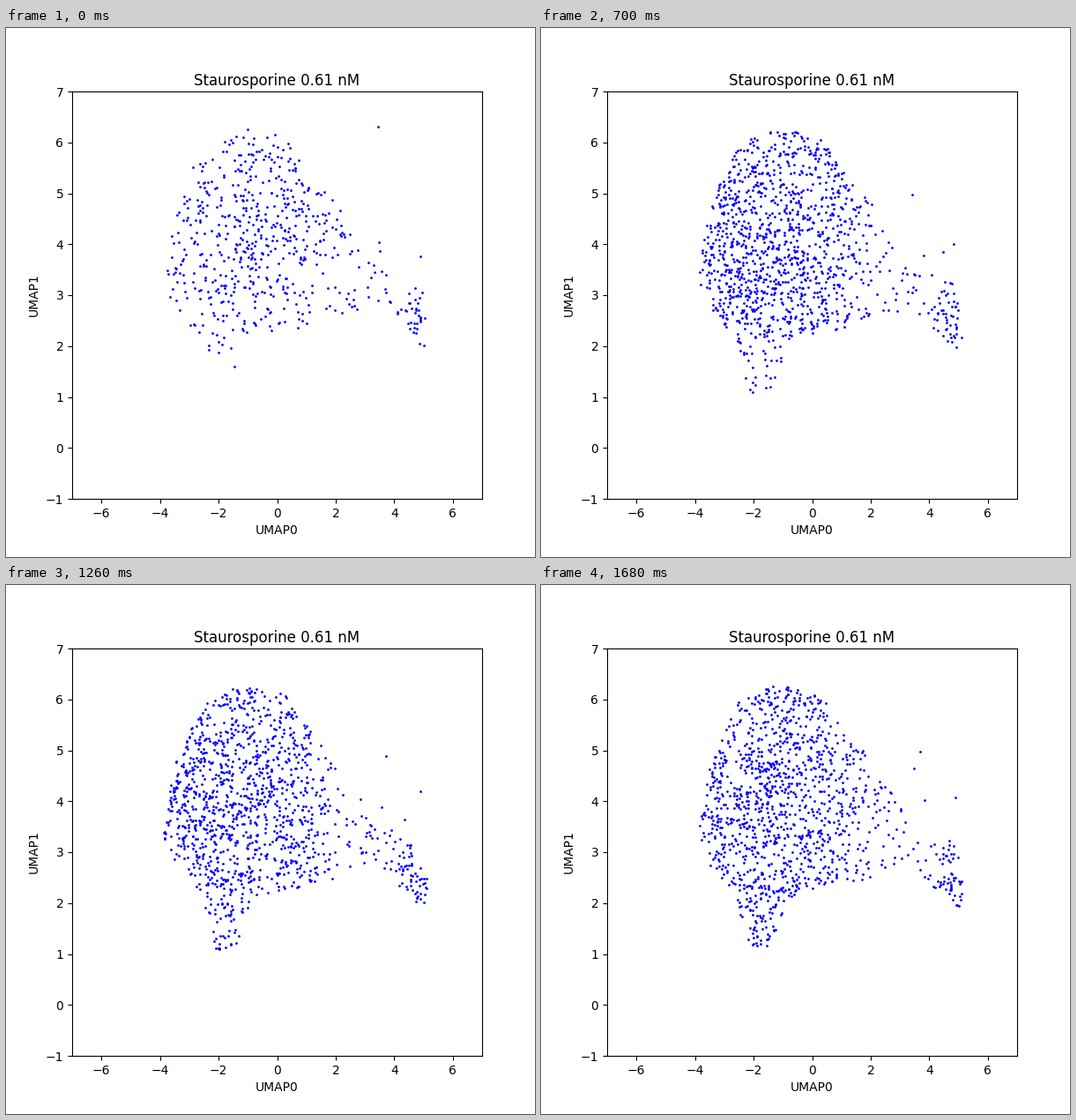
Recreate the animation shown at these times as a matplotlib script. Size 600x600 px, loop 1.82 s.

```python
import numpy as np
import matplotlib.pyplot as plt
from matplotlib.animation import FuncAnimation
from matplotlib.path import Path

FRAMES, STEP = 13, 140

# body, arm to the right, foot at the bottom
OUTLINE = Path([(-3.9, 3.3), (-3.5, 4.8), (-2.5, 5.95), (-1.4, 6.3),
                (0.2, 6.15), (1.4, 5.2), (2.3, 4.6), (3.3, 3.6), (4.9, 3.2),
                (5.2, 2.2), (5.0, 1.9), (3.3, 2.75), (1.5, 2.4), (-0.9, 2.1),
                (-1.3, 1.2), (-2.2, 1.05), (-2.6, 2.15), (-3.5, 2.75)])


def sigmoid(v):
    return 1 / (1 + np.exp(-v))


def bump(x, y, cx, cy, size):
    return np.exp(-((x - cx) ** 2 + (y - cy) ** 2) / (2 * size ** 2))


def density(x, y, step, rng):
    early = np.exp(-1.5 * step)
    late = (step / (FRAMES - 1)) ** 2
    # the crowd moves from the right side to the left
    w = 0.8 + (0.4 + 0.4 * early) * bump(x, y, 3 * early - 2.4, 4 + 0.7 * early, 0.9)
    for cx, cy in rng.normal((-1.2, 4.2), 1.1, (4, 2)):
        w += 0.35 * bump(x, y, cx, cy, 0.4)
    thin = 0.32 + 0.3 * early
    w *= thin + (1 - thin) * sigmoid(4 * (1.5 - x))
    # the foot fills up over time
    low = 0.4 + 0.7 * late
    w *= low + (1 - low) * sigmoid(10 * (y - 2.35))
    return w + (1.1 + 0.6 * early) * bump(x, y, 4.8, 2.5, 0.4)


def cells(step):
    rng = np.random.default_rng(100 + step)
    count = int(1230 - 640 * np.exp(-1.5 * step))
    box = OUTLINE.get_extents()
    pts = rng.uniform(box.min, box.max, (16 * count, 2))
    pts = pts[OUTLINE.contains_points(pts)]
    w = density(*pts.T, step, rng)
    pts = pts[rng.uniform(0, w.max(), len(w)) < w][:count]
    strays = (3.4, 3.6) + rng.exponential((0.5, 0.6), (4, 2)).clip(max=(1.5, 2.7))
    return np.vstack([pts, strays])


fig, ax = plt.subplots(figsize=(6, 6), dpi=100)
ax.set(xlim=(-7, 7), ylim=(-1, 7), xlabel="UMAP0", ylabel="UMAP1")
ax.set_title("Staurosporine 0.61 nM", pad=5.3)
dots, = ax.plot([], [], ".", color="blue", markersize=2)
clouds = [cells(i) for i in range(FRAMES)]


def update(i):
    dots.set_data(*clouds[i].T)
    return dots,


anim = FuncAnimation(fig, update, frames=FRAMES, interval=STEP, repeat=True,
                     repeat_delay=0)
plt.show()
```
